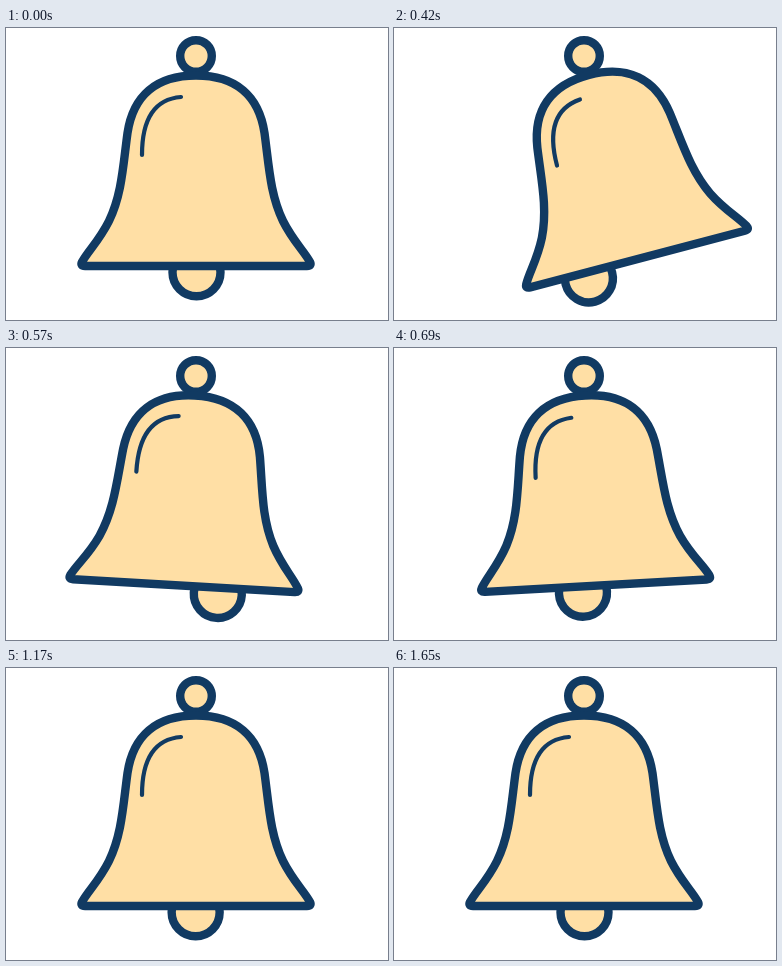
An HTML page that plays this animation: 382 by 292 pixels, repeating every 2220 ms.

```html
<!DOCTYPE html>
<html lang="en">
<head>
<meta charset="utf-8">
<title>Ringing bell</title>
<style>
  html, body { margin: 0; width: 100%; height: 100%; overflow: hidden; background: #fff; }
  svg { display: block; width: 100vw; height: 100vh; }
  .part { fill: #ffdfa5; stroke: #113a62; stroke-width: 8.4; stroke-linejoin: round; }
  .shine { fill: none; stroke: #113a62; stroke-width: 4.2; stroke-linecap: round; }
</style>
</head>
<body>
<svg viewBox="0 0 382 292">
  <circle class="part" cx="190" cy="28" r="15.8"/>
  <g id="bell">
    <circle id="clapper" class="part" cx="190.5" cy="244.3" r="24"/>
    <path class="part" d="M190 47.5 C150 47.5 127 68 121.5 105 C117 138 116 166 103 193
      C93 213 82 223 76 234 Q74 238 79 238 H301 Q306 238 304 234
      C298 223 287 213 277 193 C264 166 263 138 258.5 105 C253 68 230 47.5 190 47.5 Z"/>
    <path class="shine" d="M136 127 C136 91 149 71 175 69"/>
  </g>
</svg>
<script>
  const LOOP = 2220, STEP = 30, REST = 330, START = 276;
  const bell = document.getElementById('bell');
  const clapper = document.getElementById('clapper');

  const ease = u => (1 - Math.cos(Math.PI * u)) / 2;

  // Eases from peak to peak; each beat lasts `grow` ms longer than the last.
  function swing(t, beat, grow, peaks) {
    if (t < REST) return 0;
    let left = t - START, from = 0;
    for (const to of peaks) {
      if (left < beat) return from + (to - from) * ease(left / beat);
      left -= beat;
      beat += grow;
      from = to;
    }
    return from;
  }

  function draw(ms) {
    const t = Math.floor((ms % LOOP) / STEP) * STEP;
    const angle = swing(t, 115, 3, [-20, 17, -10, 4.3, 1.3, 0]);
    const slide = swing(t, 112, 46, [-62, 36, -26, 5, -4.5, 0]);
    bell.setAttribute('transform', `rotate(${angle} 190 28)`);
    clapper.setAttribute('transform', `translate(${slide} 0)`);
  }

  let origin;
  function tick(now) {
    origin ??= now;
    draw(Math.max(0, now - origin));
    requestAnimationFrame(tick);
  }
  draw(0);
  requestAnimationFrame(tick);
</script>
</body>
</html>
```
